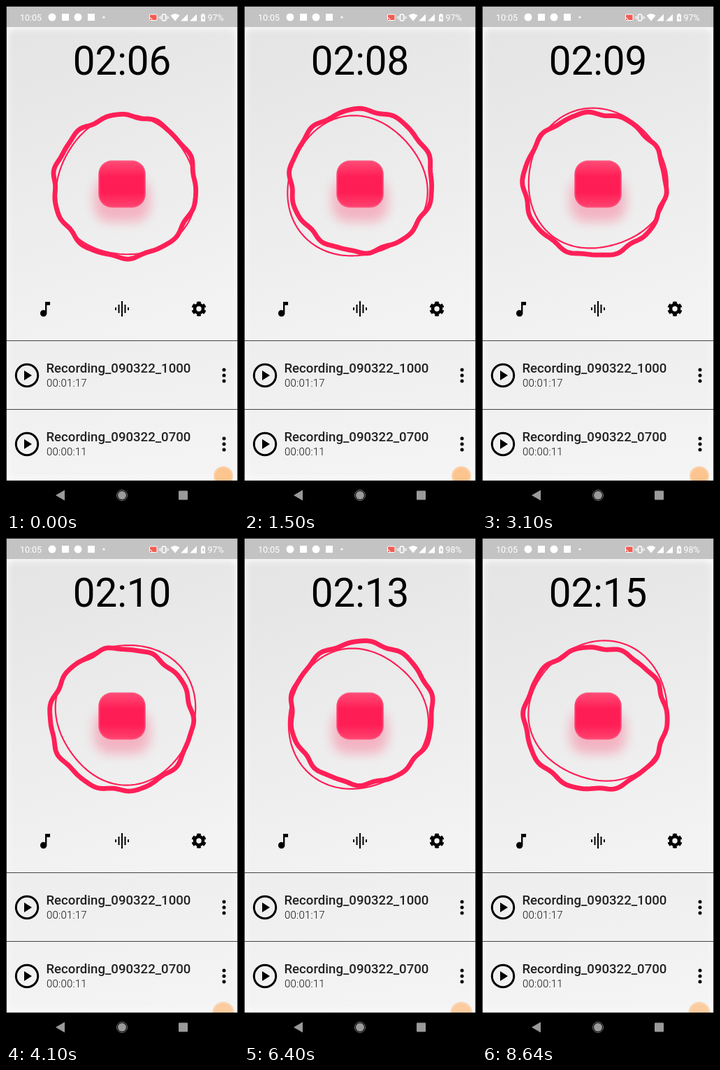
Write an HTML page that moves like this. It is 332x719 px and loops after 8780 ms.

```html
<!DOCTYPE html>
<html lang="en">
<head>
<meta charset="utf-8">
<title>Voice recorder</title>
<style>
html, body { margin: 0; width: 100%; height: 100%; overflow: hidden; background: #000; }
svg { display: block; width: 332px; height: 719px; font-family: Roboto, sans-serif; }
.ring { fill: none; stroke: #ff1f57; stroke-linejoin: round; }
.status { font-size: 12.5px; fill: #fff; }
.title { font-size: 18.6px; font-weight: 500; fill: #222; }
.length { font-size: 15px; font-weight: 300; letter-spacing: .2px; fill: #111; }
</style>
</head>
<body>
<svg viewBox="0 0 332 719">
  <defs>
    <linearGradient id="page" x1=".3" y1="0" x2=".55" y2="1">
      <stop offset="0" stop-color="#e5e5e5"/><stop offset="1" stop-color="#f3f3f3"/>
    </linearGradient>
    <linearGradient id="list" x1=".35" y1="0" x2=".6" y2="1">
      <stop offset="0" stop-color="#eee"/><stop offset="1" stop-color="#f4f4f4"/>
    </linearGradient>
    <linearGradient id="sheen" x2="0" y2="1">
      <stop offset="0" stop-color="#ff4d77"/><stop offset=".35" stop-color="#ff1d55"/>
      <stop offset=".68" stop-color="#ff1d55"/><stop offset="1" stop-color="#ff446f"/>
    </linearGradient>
    <radialGradient id="bubble">
      <stop offset=".75" stop-color="#fcc48f"/><stop offset="1" stop-color="#fcc99a" stop-opacity=".7"/>
    </radialGradient>
    <filter id="blur" x="-50%" y="-50%" width="200%" height="200%"><feGaussianBlur stdDeviation="8"/></filter>
    <filter id="soft" x="-10%" y="-10%" width="120%" height="120%"><feGaussianBlur stdDeviation="5"/></filter>
    <clipPath id="body"><path d="M0 30H332V677H0Z"/></clipPath>
    <g id="row">
      <circle cx="30" cy="49.5" r="15.7" fill="none" stroke="#000" stroke-width="3"/>
      <path d="M26 42.5v14l11-7z"/>
      <path stroke="#000" stroke-width="5" stroke-linecap="round" d="M312 41.5h0M312 49.5h0M312 57.5h0"/>
    </g>
  </defs>

  <g clip-path="url(#body)">
    <path fill="url(#page)" d="M0 30H332V477H0Z"/>
    <path fill="url(#list)" d="M0 477H332V677H0Z"/>
    <rect x="-3" y="27" width="338" height="653" rx="14" fill="none" stroke="#fff" stroke-width="9" filter="url(#soft)"/>
  </g>
  <path fill="#c3c3c3" d="M0 0H332V30H0Z"/>

  <g class="status">
    <text x="20" y="20.5">10:05</text>
    <circle cx="66" cy="16" r="5.5"/>
    <rect x="80" y="11" width="10" height="10"/>
    <circle cx="103" cy="16" r="5.5"/>
    <rect x="117" y="11" width="10" height="10"/>
    <circle cx="140" cy="16" r="1.6"/>
    <rect x="205.5" y="12" width="10.5" height="8.5" rx="1" fill="#ef5d55" stroke="#fff"/>
    <path fill="none" stroke="#fff" d="M206 17q3 0 3 3M221.5 14v5M219.5 15v3M230.5 14v5M232.5 15v3"/>
    <rect x="223.5" y="12" width="5" height="9" rx="1" fill="none" stroke="#fff" stroke-width="1.5"/>
    <path d="M235.5 13.5q6.500-5 13 0l-6.500 8zM250 21.5h10v-10zM263 21.5h10v-10zM279 12.5h1.500v-1.500h3v1.500h1.500v9.500h-6z"/>
    <path fill="#c3c3c3" d="M282.5 13.5l-2 4h1.500v3l2-4h-1.500z"/>
    <text id="battery" x="288.5" y="20.5"></text>
  </g>

  <text id="timer" x="166" y="98" font-size="56.5" text-anchor="middle"></text>

  <rect x="126" y="246" width="80" height="62" rx="22" fill="#ff3b6b" opacity=".32" filter="url(#blur)"/>
  <rect x="132.5" y="220.5" width="67" height="67" rx="19" fill="url(#sheen)"/>
  <rect x="133.5" y="221.5" width="65" height="65" rx="18" fill="none" stroke="#ff5c82" stroke-width="2" opacity=".45"/>
  <path id="thin" class="ring" stroke-width="2.2"/>
  <path id="thick" class="ring" stroke-width="6.8"/>

  <path transform="translate(42 418.5)scale(1.17)" d="M12 3v10.550c-.6-.35-1.300-.55-2-.55-2.200 0-4 1.800-4 4s1.800 4 4 4 4-1.800 4-4V7h4V3z"/>
  <path stroke="#000" stroke-width="2" d="M157 430v4M161.5 426v12M166 421v22M170.5 426v12M175 430v4"/>
  <g fill="none" stroke="#000" transform="translate(276 432)rotate(-90)">
    <circle r="6" stroke-width="4.6"/>
    <circle r="8.7" stroke-width="3.6" pathLength="60" stroke-dasharray="6 4" stroke-dashoffset="3"/>
  </g>

  <path stroke="#444" d="M0 477.5H332M0 575.5H332"/>
  <rect x=".5" y=".5" width="331" height="718" fill="none" stroke="#222"/>
  <use href="#row" y="477.5"/>
  <use href="#row" y="575.5"/>
  <text class="title" x="57.5" y="523">Recording_090322_1000</text>
  <text class="length" x="58" y="543">00:01:17</text>
  <text class="title" x="57.5" y="621">Recording_090322_0700</text>
  <text class="length" x="58" y="641">00:00:11</text>
  <circle id="dot" cx="311" fill="url(#bubble)" clip-path="url(#body)"/>

  <path d="M0 677H332V719H0Z"/>
  <g fill="#9a9a9a">
    <path d="M71 698l13-7.500v15z"/>
    <circle cx="166" cy="698" r="6"/>
    <circle cx="166" cy="698" r="7.5" fill="none" stroke="#777"/>
    <rect x="247" y="691.5" width="13" height="13" rx="1"/>
  </g>
</svg>
<script>
const LOOP = 8780, STEP = 100, LAST = 8640;
const SPIN = 360 / 5000; // degrees per ms
const $ = id => document.getElementById(id);
const set = (id, attrs) => {
  for (const k in attrs) $(id).setAttribute(k, attrs[k]);
};

// One ripple: height, number of lobes, angle of a crest in degrees
const wave = (deg, height, lobes, crest) =>
  height * Math.cos(lobes * (deg - crest) * Math.PI / 180);

// Closed outline around the button, from a radius for each angle
function ring(radius) {
  const pts = [];
  for (let deg = 0; deg < 360; deg += 2) {
    const a = deg * Math.PI / 180, r = radius(deg);
    pts.push(`${(166 + r * Math.cos(a)).toFixed(2)} ${(254 + r * Math.sin(a)).toFixed(2)}`);
  }
  return `M${pts.join('L')}Z`;
}

const turn = (id, deg) => set(id, { transform: `rotate(${deg} 166 254)` });

function draw(t) {
  turn('thick', -SPIN * t);
  turn('thin', SPIN * t);
  const sec = 6 + Math.floor(t / 1000 + 0.8);
  $('timer').textContent = '02:' + String(sec).padStart(2, '0');
  $('battery').textContent = t < 4600 ? '97%' : '98%';
  const drop = Math.min(1, Math.max(0, (t - 3600) / 400));
  set('dot', { cy: 670.5 + 7 * drop, r: 14 + 2 * drop, opacity: 1 - 0.15 * drop });
}

set('thick', { d: ring(a => 101.5 + wave(a, 5, 1, 38) + wave(a, 1.9, 10, -59) + wave(a, 0.7, 17, 0)) });
set('thin', { d: ring(a => 99.5 + wave(a, 7, 1, 30) + wave(a, 3, 3, -90)) });

const start = performance.now();
function tick(now) {
  const t = Math.max(0, now - start) % LOOP;
  // Ten pictures a second, with a longer hold at the end
  draw(t >= LAST ? LAST : Math.min(8500, Math.floor(t / STEP) * STEP));
  requestAnimationFrame(tick);
}
draw(0);
requestAnimationFrame(tick);
</script>
</body>
</html>
```
